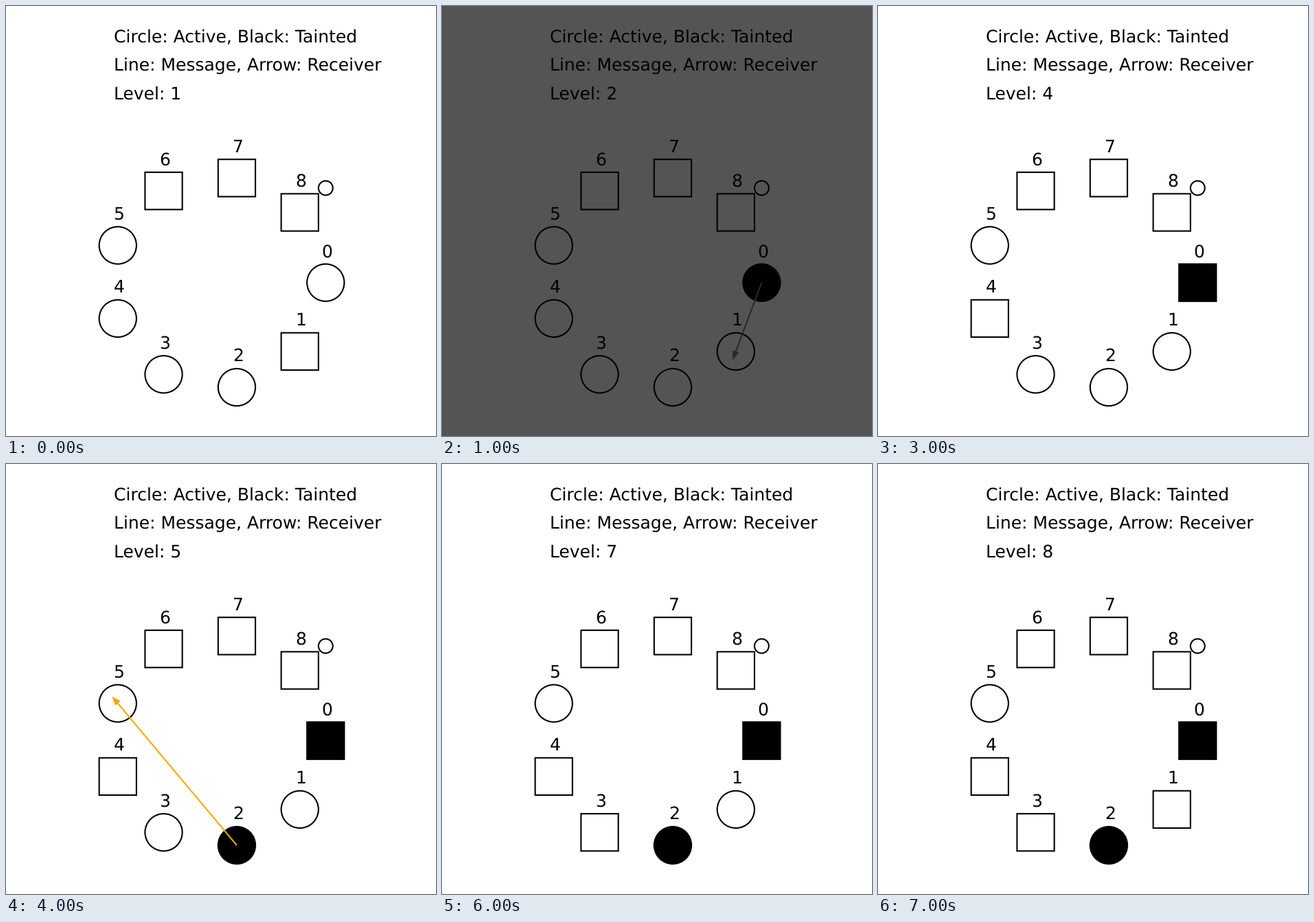
A matplotlib script for the animation above (8 s loop, 626 by 626 pixels).

```python
import numpy as np
import matplotlib.pyplot as plt
from matplotlib.animation import FuncAnimation
from matplotlib.patches import Circle, Polygon, Rectangle

plt.rcParams["font.family"] = "DejaVu Sans"
plt.rcParams["text.hinting"] = "none"

SIDE = 626            # stage in pixels
UNITS = 300           # stage in drawing units
PT = SIDE / UNITS * 0.72   # points per drawing unit at 100 dpi

LEVELS = 8
RADIUS = 13
NODES = np.array([(223, 193), (205, 241), (161, 266), (110, 257), (78, 218),
                  (78, 167), (110, 129), (161, 120), (205, 144)], float)

# Half-open step ranges during which a node is active
ACTIVE = {0: (0, 2), 1: (1, 7), 2: (0, 8), 3: (0, 6), 4: (0, 3), 5: (0, 8)}
TAINTED_FROM = {0: 1, 2: 4}
# sender, receiver, first step, end step, colour
MESSAGES = [(0, 1, 1, 2, "#2a2a2a"), (2, 5, 4, 6, "#ffa500")]
DIM_STEP = 1

fig = plt.figure(figsize=(6.26, 6.26), dpi=100, facecolor="white")
ax = fig.add_axes([0, 0, 1, 1])
ax.set_xlim(0, UNITS)
ax.set_ylim(UNITS, 0)
ax.axis("off")

backdrop = ax.add_patch(Rectangle((-1, -1), UNITS + 2, UNITS + 2, lw=0, zorder=0))


def label(x, y, text):
    return ax.text(x, y, text, fontsize=12 * PT, color="black",
                   ha="left", va="baseline", zorder=4)


def outline(patch):
    patch.set(edgecolor="black", facecolor="none", linewidth=PT, snap=False, zorder=2)
    return ax.add_patch(patch)


def arrow(start, end, color):
    d = (end - start) / np.hypot(*(end - start))
    side = np.array([-d[1], d[0]]) * 2.4
    line, = ax.plot(*zip(start, end), color=color, lw=PT,
                    solid_capstyle="butt", zorder=3)
    head = ax.add_patch(Polygon([end + 6.25 * d, end + side, end - side],
                                facecolor=color, lw=0, zorder=3))
    return line, head


label(75, 25, "Circle: Active, Black: Tainted")
label(75, 45, "Line: Message, Arrow: Receiver")
level = label(75, 65, "")

outline(Circle((223, 127), 5))
circles, squares = [], []
for i, (x, y) in enumerate(NODES):
    label(x - 3, y - 18, str(i))
    circles.append(outline(Circle((x, y), RADIUS)))
    squares.append(outline(Rectangle((x - RADIUS, y - RADIUS), 2 * RADIUS, 2 * RADIUS)))

arrows = [(arrow(NODES[a], NODES[b], color), first, end)
          for a, b, first, end, color in MESSAGES]


def update(step):
    backdrop.set_facecolor("#545454" if step == DIM_STEP else "white")
    level.set_text(f"Level: {step + 1}")
    for i, (circle, square) in enumerate(zip(circles, squares)):
        first, end = ACTIVE.get(i, (0, 0))
        active = first <= step < end
        fill = "black" if step >= TAINTED_FROM.get(i, LEVELS) else "none"
        circle.set(visible=active, facecolor=fill)
        square.set(visible=not active, facecolor=fill)
    for parts, first, end in arrows:
        for part in parts:
            part.set_visible(first <= step < end)
    return []


anim = FuncAnimation(fig, update, frames=LEVELS, interval=1000,
                     repeat=True, repeat_delay=0, blit=False)
plt.show()
```
